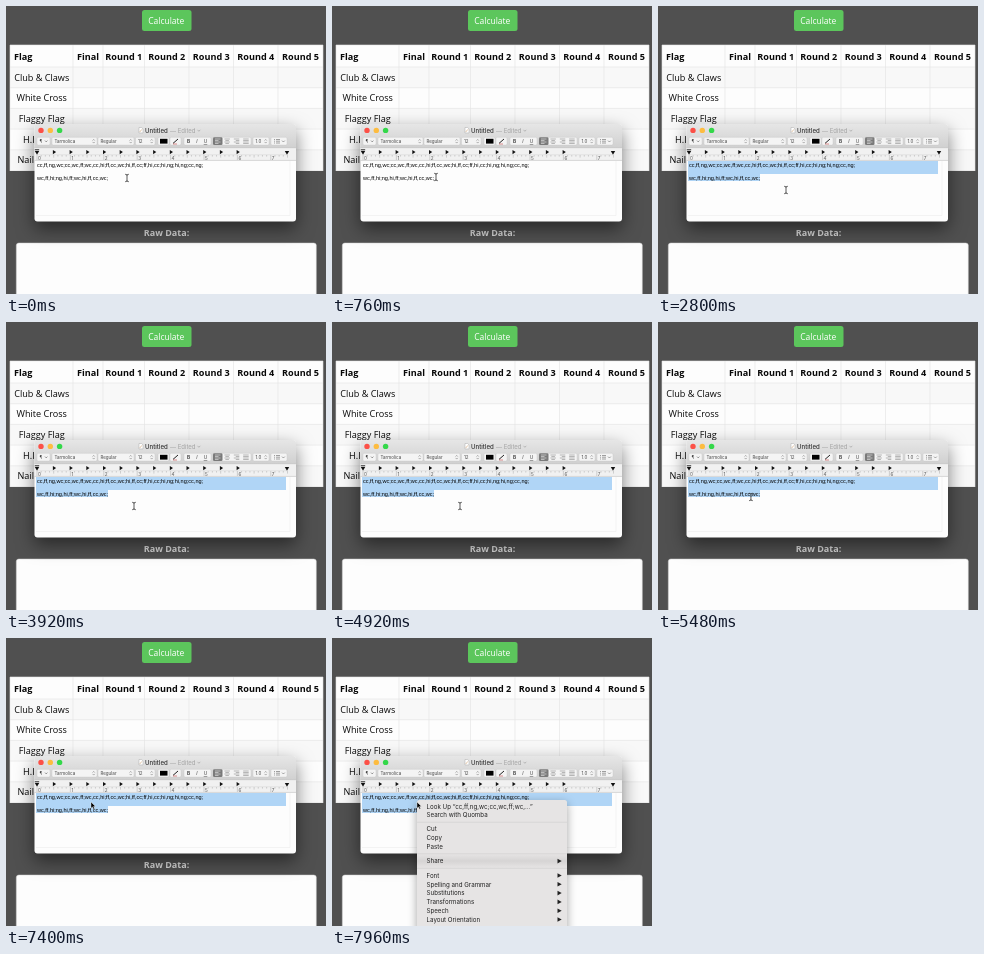
Write an HTML page that moves like this. It is 320x288 px and loops after 8 s.

```html
<!DOCTYPE html>
<html lang="en">
<head>
<meta charset="utf-8">
<title>Copying raw data</title>
<style>
  html, body { margin: 0; width: 100%; height: 100%; overflow: hidden; background: #505050; }
  svg { display: block; width: 320px; height: 288px; }
  text { white-space: pre; }
  .page { font-family: "Open Sans", "Noto Sans", sans-serif; font-size: 9.1px; }
  .ui { font-family: Inter, Roboto, sans-serif; }
  .doc { font-family: "Liberation Sans", Arial, sans-serif; font-size: 5.57px; }
  #window { filter: drop-shadow(0 7px 9px rgba(0, 0, 0, .5)); }
  #menu { filter: drop-shadow(0 3px 5px rgba(0, 0, 0, .35)); }
</style>
</head>
<body>
<svg id="stage" viewBox="0 0 320 288">
  <defs>
    <linearGradient id="chrome" x2="0" y2="1">
      <stop stop-color="#e6e6e6"/><stop offset="1" stop-color="#d0d0d0"/>
    </linearGradient>
    <linearGradient id="band" x2="0" y2="1">
      <stop stop-color="#e6e4e4"/><stop offset=".5" stop-color="#d6d4d4"/><stop offset="1" stop-color="#e6e4e4"/>
    </linearGradient>
  </defs>
  <g id="page" class="page"></g>
  <g id="window"></g>
  <g id="menu" class="ui"></g>
  <g id="beam" fill="none">
    <path d="M-1.8-3.7Q0-3.7 0-2.7Q0-3.7 1.8-3.7M0-3V3M-1.8 3.7Q0 3.7 0 2.7Q0 3.7 1.8 3.7" stroke="#222" stroke-width=".75"/>
  </g>
  <path id="arrow" d="M0 0V6.2L1.5 4.9L2.5 7.2L3.6 6.7L2.6 4.5H4.5Z" fill="#000" stroke="#fff" stroke-width=".4"/>
</svg>
<script>
const $ = id => document.getElementById(id);

function add(parent, tag, attrs, content) {
  const node = document.createElementNS("http://www.w3.org/2000/svg", tag);
  for (const key in attrs) node.setAttribute(key, attrs[key]);
  if (content) node.textContent = content;
  return parent.appendChild(node);
}
const rect = (g, x, y, width, height, fill, more) =>
  add(g, "rect", { x, y, width, height, fill, ...more });
const path = (g, d, stroke, width = 0.6, fill = "none") =>
  add(g, "path", { d, stroke, "stroke-width": width, fill });
const text = (g, x, y, content, more) => add(g, "text", { x, y, ...more }, content);

function drawPage(g) {
  rect(g, 0, 0, 320, 288, "#505050");
  rect(g, 136, 4, 49.5, 21, "#5cc65c", { rx: 2.5 });
  text(g, 160.3, 18, "Calculate", { fill: "#fff", "font-size": 8.5, "text-anchor": "middle" });

  const rows = ["Club & Claws", "White Cross", "Flaggy Flag"];
  const top = 39, head = 22, step = 20.7, cols = [4, 67, 97, 138.5, 183, 227.5, 272, 317];
  rect(g, 4, top, 313, 126, "#fdfdfd");
  for (let i = 0; i < 5; i += 2) rect(g, 4, top + head + i * step, 313, step, "#f8f8f8");
  let grid = cols.map(x => `M${x} ${top}V165`).join("") + `M4 ${top}H317`;
  for (let i = 0; i < 6; i++) grid += `M4 ${top + head + i * step}H317`;
  path(g, grid, "#e2e2e2");

  const dark = { fill: "#080808" };
  const bold = { ...dark, "font-weight": 700 };
  const middle = { "text-anchor": "middle" };
  text(g, 8, 53.6, "Flag", bold);
  ["Final", "Round 1", "Round 2", "Round 3", "Round 4", "Round 5"].forEach((label, i) =>
    text(g, (cols[i + 1] + cols[i + 2]) / 2, 53.6, label, { ...bold, ...middle }));
  rows.forEach((label, i) =>
    text(g, 35.7, 74.6 + i * step, label, { ...dark, ...middle }));
  text(g, 17, 136.7, "H.I.", dark);
  text(g, 11.5, 157.4, "Nail", dark);

  text(g, 160.5, 230, "Raw Data:", { ...bold, ...middle, fill: "#d8d8d8", "font-size": 9 });
  rect(g, 10.3, 237, 300, 60, "#fdfdfd", { rx: 2.5, stroke: "#ccc", "stroke-width": 0.5 });
}

function drawToolbar(g) {
  const box = (x, w, label, arrows) => {
    rect(g, x, 131.3, w, 7.8, "#f4f4f4", { rx: 1.3, stroke: "#c4c4c4", "stroke-width": 0.4 });
    if (label) text(g, x + 2.4, 136.8, label, { fill: "#444", "font-size": 4.5 });
    if (arrows) path(g, `M${x + w - 4.4} 134.6l1.1-1.2l1.1 1.2m0 1.3l-1.1 1.2l-1.1-1.2`, "#666", 0.5);
  };
  box(31, 13);
  text(g, 33.4, 136.8, "¶", { fill: "#444", "font-size": 4.5 });
  path(g, "M39 134.6l1.2 1.3l1.2-1.3", "#555", 0.6);
  box(46, 45, "Tarmolica", true);
  box(92, 36, "Regular", true);
  box(129.5, 19.5, "12", true);
  box(152, 11);
  rect(g, 154, 132.8, 7.5, 4.8, "#000");
  box(164, 11);
  path(g, "M167 137.4L172 133", "#222", 1);
  path(g, "M167 138H171", "#c44", 0.6);
  box(178, 27);
  ["B", "I", "U"].forEach((letter, i) => text(g, 182.5 + i * 8.5, 137, letter, {
    fill: "#444", "font-size": 4.8, "text-anchor": "middle",
    "font-weight": i ? 400 : 700,
    "font-style": i == 1 ? "italic" : "normal",
    "text-decoration": i == 2 ? "underline" : "none"
  }));
  box(207, 38);
  rect(g, 207, 131.3, 9.5, 7.8, "#7a7a7a", { rx: 1.3 });
  for (let i = 0; i < 4; i++) {
    let lines = "";
    for (let j = 0; j < 4; j++) {
      const cut = j % 2 && i < 3 ? 2 : 0;
      lines += `M${209 + i * 9.4 + cut * i / 2} ${133 + j * 1.5}h${5.5 - cut}`;
    }
    path(g, lines, i ? "#777" : "#fff", 0.5);
  }
  box(247, 16, "1.0", true);
  box(265, 16);
  path(g, "M268 133.5h1M268 135.2h1M268 137h1M270 133.5h4M270 135.2h4M270 137h4M276 134.6l1.4 1.4l1.4-1.4", "#666", 0.6);
}

function drawRuler(g) {
  rect(g, 28.5, 141.7, 261.5, 12.8, "#f1f1f1");
  path(g, "M28.5 141.7H290M28.5 154.4H290", "#b5b5b5", 0.5);
  path(g, "M31 148.8H281", "#ccc", 0.4);
  const unit = 33.4;
  let ticks = "";
  for (let i = 0; i <= 60; i++)
    ticks += `M${31 + i * unit / 8} 149v${i % 8 ? (i % 4 ? 1.6 : 2.6) : 5}`;
  path(g, ticks, "#999", 0.4);
  for (let i = 0; i < 8; i++)
    text(g, 32 + i * unit, 153.6, String(i), { fill: "#555", "font-size": 4.6 });
  for (let i = 1; i <= 12; i++)
    path(g, `M${30.2 + i * unit / 2} 144l3.2 2.1l-3.2 2.1z`, "none", 0, "#111");
  for (const x of [31, 281]) path(g, `M${x - 2.2} 145h4.4l-2.2 3.8z`, "none", 0, "#111");
  path(g, "M28.8 143.8h4.4", "#111", 0.9);
}

function drawWindow(g) {
  rect(g, 28.5, 118, 261.5, 97.5, "#fdfdfd", { rx: 3 });
  add(g, "path", { d: "M28.5 142V121q0-3 3-3H287q3 0 3 3V142Z", fill: "url(#chrome)" });
  const ui = add(g, "g", { class: "ui" });
  ["#fc5047", "#fdbc40", "#34d84a"].forEach((fill, i) =>
    add(ui, "circle", { cx: 35 + i * 9.3, cy: 124.4, r: 2.7, fill }));
  path(ui, "M133 121.5h2.6l1.4 1.4v4h-4z", "#999", 0.4, "#fff");
  path(ui, "M133.7 126l2.2-2.6", "#c96", 0.6);
  text(ui, 139, 126.6, "Untitled", { fill: "#333", "font-size": 6.1, "font-weight": 500 });
  text(ui, 164, 126.6, "— Edited", { fill: "#a4a4a4", "font-size": 6 });
  path(ui, "M191.5 123.8l1.4 1.5l1.4-1.5", "#999", 0.6);
  drawToolbar(ui);
  drawRuler(ui);
  path(g, "M284 155V209.5H30", "#e8e8e8", 0.5);

  const marks = add(g, "g", { id: "selection" });
  rect(marks, 30, 155, 250, 13, "#b0d5f6");
  rect(marks, 30, 168, 72, 7, "#b0d5f6");
  const doc = add(g, "g", { class: "doc", fill: "#000" });
  text(doc, 31, 160.9, "cc,ff,ng,wc;cc,wc,ff;wc,cc,hi;ff,cc,wc;hi,ff,cc;ff,hi,cc;hi,ng;hi,ng;cc,ng;");
  text(doc, 31, 173.5, "wc,ff,hi;ng,hi,ff;wc,hi,ff,cc,wc;");
  rect(g, 101.7, 168, 0.8, 6.8, "#000", { id: "caret" });
}

function drawMenu(g) {
  rect(g, 85, 162, 150, 140, "#e6e4e4", { rx: 2.5 });
  rect(g, 85, 216, 150, 14, "url(#band)");
  const items = [
    [170.5, "Look Up “cc,ff,ng,wc;cc,wc,ff;wc,…”"], [179.4, "Search with Quomba"],
    [193.4, "Cut"], [202.2, "Copy"], [211, "Paste"],
    [225.3, "Share", true],
    [239.7, "Font", true], [248.5, "Spelling and Grammar", true], [257.3, "Substitutions", true],
    [266.1, "Transformations", true], [274.9, "Speech", true], [283.7, "Layout Orientation", true]
  ];
  for (const [y, label, sub] of items) {
    text(g, 94.5, y, label, { fill: "#222", "font-size": 6.2 });
    if (sub) path(g, `M225.5 ${y - 4.5}l4.2 2.3l-4.2 2.3z`, "none", 0, "#222");
  }
  path(g, "M85 184.2H235M85 215.8H235M85 230.3H235", "#d2d0d0", 0.7);
}

drawPage($("page"));
drawWindow($("window"));
drawMenu($("menu"));

// Pointer path: time, x, y
const LOOP = 8000;
const route = [
  [40, 121, 172], [440, 104, 171], [1160, 104, 171], [1760, 128, 184],
  [4960, 128, 184], [5320, 100, 180], [5640, 86, 170], [5840, 85, 164], [LOOP, 85, 164]
];
const ease = p => p * p * (3 - 2 * p);

function pointerAt(t) {
  const next = route.findIndex(stop => stop[0] > t);
  if (next < 1) return route[0].slice(1);
  const [t0, x0, y0] = route[next - 1], [t1, x1, y1] = route[next];
  const p = ease((t - t0) / (t1 - t0));
  return [x0 + (x1 - x0) * p, y0 + (y1 - y0) * p];
}

const show = (id, on) => $(id).setAttribute("visibility", on ? "visible" : "hidden");

function render(t) {
  const at = `translate(${pointerAt(t).join(" ")})`;
  $("beam").setAttribute("transform", at);
  $("arrow").setAttribute("transform", at);
  show("caret", t >= 1040 && t < 2320);
  show("selection", t >= 2320);
  show("beam", t < 6920);
  show("arrow", t >= 6920);
  show("menu", t >= 7640);
}

const start = performance.now();
function tick() {
  render((performance.now() - start) % LOOP);
  requestAnimationFrame(tick);
}
tick();
</script>
</body>
</html>
```
